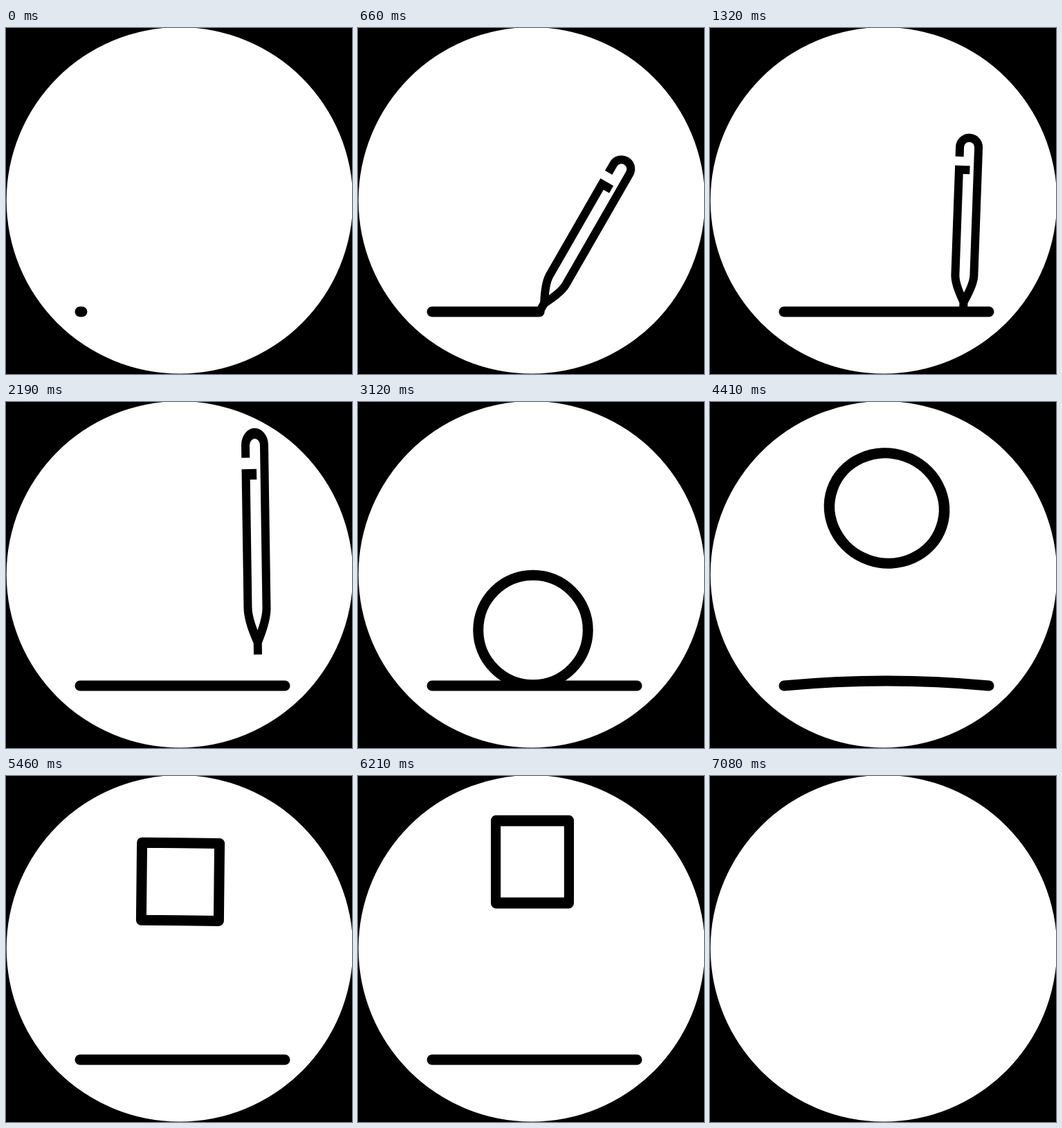
Recreate the animation shown at these times as an HTML page. Size 500 by 500 pixels, loop 7.17 s.

```html
<!DOCTYPE html>
<html lang="en">
<head>
<meta charset="utf-8">
<title>Pencil, line, ball, box</title>
<style>
html, body { margin: 0; height: 100%; overflow: hidden; background: #000; }
svg { display: block; width: 100%; height: 100%; }

.ink { fill: none; stroke: #000; stroke-width: 15; stroke-linejoin: round; }
#pen, #ball, #line, #ground {
  animation-duration: 7170ms;
  animation-iteration-count: infinite;
  animation-timing-function: linear;
}
#pen { stroke-width: 12; stroke-linejoin: miter; animation-name: pen-move, pen-tilt, pen-stretch; }
#ball { animation-name: ball-move, ball-turn, ball-stretch, ball-shape; }
#line {
  stroke-linecap: round;
  stroke-dasharray: 1 2;
  animation-name: line-trim, line-bend;
  animation-timing-function: linear, ease-in-out;
}
#ground { animation-name: ground-close; }

/* the pencil draws the line, settles, then shoots off the top */
@keyframes pen-move {
  0% { translate: 110px 410px; animation-timing-function: cubic-bezier(.33, 0, .67, .33); }
  12.76% { translate: 403px 410px; animation-timing-function: ease-in-out; }
  18.41% { translate: 366px 410px; }
  20.08% { translate: 364px 410px; }
  30.13% { translate: 364px 410px; }
  30.54% { translate: 364px 369px; }
  32.2%, 100% { translate: 364px -20px; }
}
@keyframes pen-tilt {
  0% { rotate: 8deg; }
  4.18% { rotate: 17deg; }
  10.04% { rotate: 32deg; animation-timing-function: ease-in-out; }
  12.76% { rotate: 19deg; animation-timing-function: ease-out; }
  18.41% { rotate: 2.1deg; }
  20.08%, 100% { rotate: -.85deg; }
}
@keyframes pen-stretch {
  0% { scale: 0 0; animation-timing-function: ease-out; }
  4.18% { scale: 1 1; }
  20.08% { scale: 1 1; animation-timing-function: ease-in-out; }
  27.2% { scale: 1.1 .88; animation-timing-function: ease-in; }
  29.71% { scale: 1.03 1; }
  30.13% { scale: 1 1.12; }
  30.54%, 100% { scale: 1 1.27; }
}

@keyframes line-trim {
  0% { stroke-dashoffset: .99; opacity: 1; animation-timing-function: cubic-bezier(.33, 0, .67, .33); }
  12.76% { stroke-dashoffset: 0; }
  86.47% { stroke-dashoffset: 0; animation-timing-function: cubic-bezier(.65, 0, .35, 1); }
  98.7% { stroke-dashoffset: -1; opacity: 1; }
  98.71%, 100% { stroke-dashoffset: -1; opacity: 0; }
}
@keyframes line-bend {
  0%, 36.82% { d: path("M107 410Q255 410 403 410"); }
  37.24% { d: path("M107 410Q255 428 403 410"); }
  37.9% { d: path("M107 410Q255 406 403 410"); }
  38.8%, 43.1% { d: path("M107 410Q255 410 403 410"); }
  43.3% { d: path("M107 410Q255 412 403 410"); }
  43.51%, 51.46% { d: path("M107 410Q255 410 403 410"); }
  58.16% { d: path("M107 410Q255 494 403 410"); animation-timing-function: ease-in; }
  59.41% { d: path("M107 410Q255 410 403 410"); animation-timing-function: ease-out; }
  60.25% { d: path("M107 410Q255 385 403 410"); }
  61.51% { d: path("M107 410Q255 396 403 410"); }
  62.76% { d: path("M107 410Q255 432 403 410"); }
  64.44% { d: path("M107 410Q255 397 403 410"); }
  66.1% { d: path("M107 410Q255 418 403 410"); }
  67.78% { d: path("M107 410Q255 406 403 410"); }
  69.74%, 100% { d: path("M107 410Q255 410 403 410"); }
}

/* the ball drops, bounces, is launched, turns into a box and falls through the line */
@keyframes ball-move {
  0%, 33.47% { translate: 253px -100px; animation-timing-function: cubic-bezier(.33, 0, .67, .33); }
  36.82% { translate: 253px 329.5px; animation-timing-function: ease-out; }
  37.24% { translate: 253px 338px; animation-timing-function: cubic-bezier(.33, .67, .67, 1); }
  40.17% { translate: 253px 252px; animation-timing-function: cubic-bezier(.33, 0, .67, .33); }
  43.1% { translate: 253px 329.5px; }
  43.3% { translate: 253px 330.5px; }
  43.51% { translate: 253px 329.5px; }
  51.46% { translate: 253px 329.5px; animation-timing-function: ease-in-out; }
  58.16% { translate: 253px 379px; animation-timing-function: ease-in; }
  59.41% { translate: 253px 322px; animation-timing-function: ease-out; }
  60.67% { translate: 254px 143px; animation-timing-function: ease-in-out; }
  61.51% { translate: 255.5px 153.5px; animation-timing-function: ease-out; }
  65.55% { translate: 252px 153px; }
  81.17% { translate: 252px 152.7px; animation-timing-function: ease-in-out; }
  85.36% { translate: 252px 109px; animation-timing-function: cubic-bezier(.33, 0, .67, .33); }
  91.73%, 100% { translate: 252px 490px; }
}
@keyframes ball-turn {
  0%, 59% { rotate: -90deg; }
  61.51% { rotate: 19deg; }
  65.55% { rotate: 85deg; animation-timing-function: ease-out; }
  69.04% { rotate: 110deg; animation-timing-function: ease-in-out; }
  71.13% { rotate: 103.4deg; animation-timing-function: ease-in-out; }
  73.92% { rotate: 88deg; animation-timing-function: ease-in-out; }
  76.15%, 81.17% { rotate: 90.6deg; }
  85.36%, 100% { rotate: 90deg; }
}
/* the quarter turn makes the first value act along the vertical */
@keyframes ball-stretch {
  0%, 51.46% { scale: 1 1; animation-timing-function: ease-in-out; }
  58.16% { scale: .92 1.06; }
  59.41% { scale: 1.1 .95; }
  61.51% { scale: 1.053 1; }
  65.55%, 85.36% { scale: 1 1; }
  89.5%, 100% { scale: 1.2 .82; }
}
@keyframes ball-shape {
  0%, 61.51% {
    d: path("M-56 -56C-25 -87 25 -87 56 -56C87 -25 87 25 56 56C25 87 -25 87 -56 56C-87 25 -87 -25 -56 -56Z");
    animation-timing-function: ease-in-out;
  }
  66.95%, 100% {
    d: path("M-56 -56C-25 -56 25 -56 56 -56C56 -25 56 25 56 56C25 56 -25 56 -56 56C-56 25 -56 -25 -56 -56Z");
  }
}
@keyframes ground-close {
  0%, 80% { height: 500px; }
  80.01%, 100% { height: 410px; }
}
</style>
</head>
<body>
<svg viewBox="0 0 500 500">
  <clipPath id="above"><rect id="ground" width="500" height="500"/></clipPath>
  <circle cx="251" cy="249.2" r="250.3" fill="#fff"/>
  <g clip-path="url(#above)">
    <path id="ball" class="ink" d="M-56 -56C-25 -87 25 -87 56 -56C87 -25 87 25 56 56C25 87 -25 87 -56 56C-87 25 -87 -25 -56 -56Z"/>
  </g>
  <path id="pen" class="ink" d="M2 -205H-13.5V-52C-13 -38 -4 -22 0 -14V0V-14C4 -22 13 -38 13.5 -52V-238A13.5 13.5 0 0 0 -13.5 -238V-224"/>
  <path id="line" class="ink" pathLength="1" d="M107 410Q255 410 403 410"/>
</svg>
</body>
</html>
```
